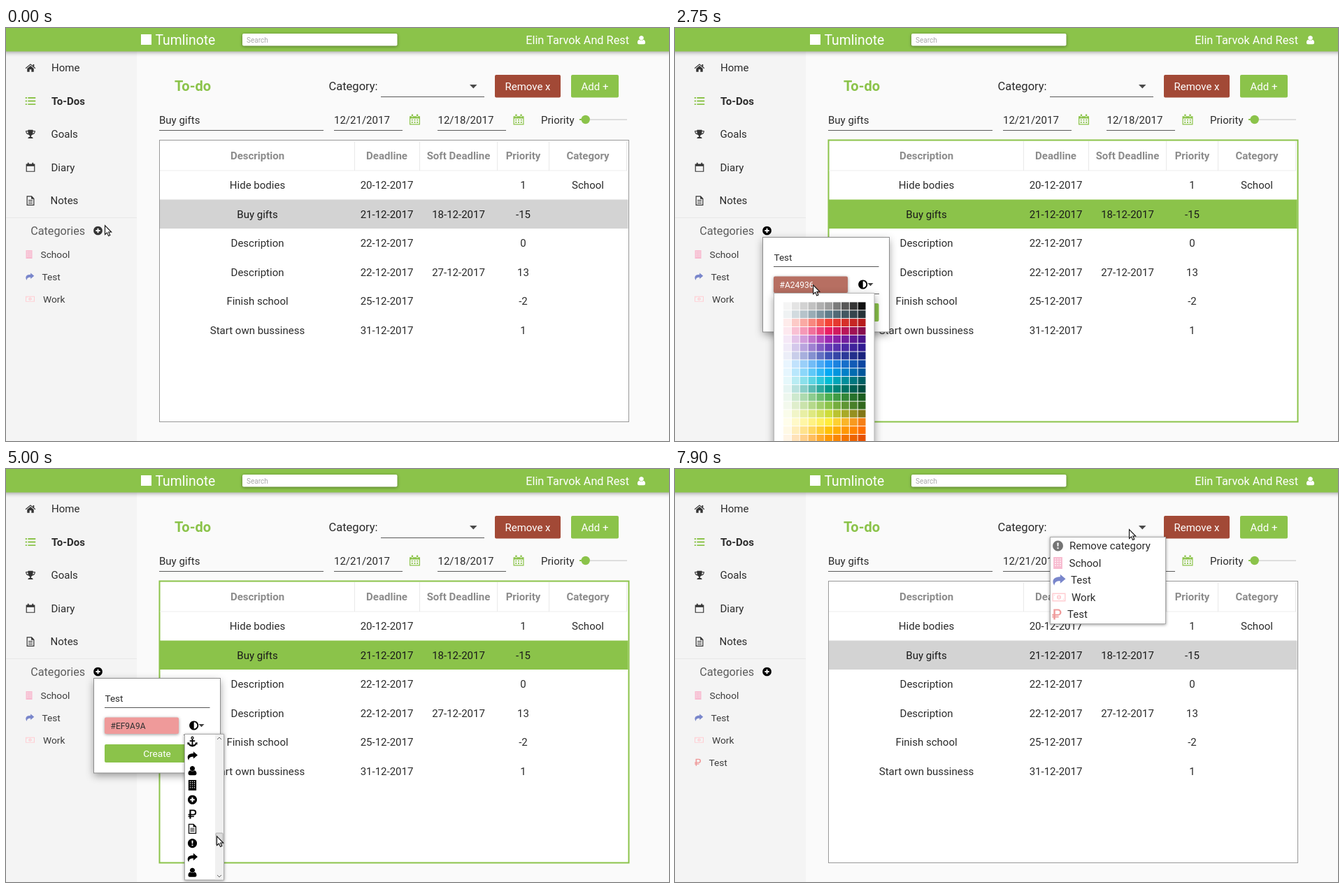
An HTML page for the animation above (8 s loop, 948x591 px).

```html
<!DOCTYPE html>
<html lang="en">
<head>
<meta charset="utf-8">
<title>To-do</title>
<style>
html, body { margin: 0; width: 100%; height: 100%; overflow: hidden; background: #fafafa; }
svg#stage { display: block; width: 100vw; height: 100vh; font-family: Roboto, sans-serif; }
text { white-space: pre; }
.bar { filter: drop-shadow(0 1px 3px rgba(0,0,0,.4)); }
.raised { filter: drop-shadow(0 1px 2px rgba(0,0,0,.4)); }
.floating { filter: drop-shadow(0 4px 6px rgba(0,0,0,.38)); }
</style>
</head>
<body>
<svg id="stage" viewBox="0 0 948 591"></svg>
<script>
const GREEN = '#8bc34a', RED = '#a24936', PINK = '#ef9a9a', INK = '#2b2b2b';
const PITCH = 20.8, LIST_ROWS = 62, PICKED = 45;

// Glyphs on a 16 x 16 grid
const bars = rows => rows.map(([x, w], i) => `M${x} ${2 + i * 3.4}h${w}v2h${-w}z`).join('');
const disc = 'M8 1a7 7 0 1 0 .01 0z';
const GLYPHS = {
  home: 'M8 1.6L16 8.4 15.2 9.4 8 3.4 .8 9.4 0 8.4zM11.8 2.4h2v4l-2-1.7zM2.8 9L8 4.7 13.2 9v5.4H9.5v-4h-3v4H2.8z',
  list: [2, 7, 12].map(y => `M0 ${y}h2.4v2H0zM4 ${y}h12v2H4z`).join(''),
  trophy: 'M4 1h8v1.5h3.6c0 4-1.6 5.6-4.6 6L9 10.6V12c2 0 3 1 3 2.6H4C4 13 5 12 7 12v-1.4L5 8.5C2 8.1.4 6.5.4 2.5H4zM1.7 3.7c.3 2 1.1 2.9 2.6 3.3L4 3.7zM14.3 3.7c-.3 2-1.1 2.9-2.6 3.3L12 3.7z',
  calendar: 'M1 2.5h2.4V.6h2v1.9h5.2V.6h2v1.9H15V15H1zM2.3 6.2v7.5h11.4V6.2z',
  file: 'M2 .5h8L14 4.6v11H2zM3.3 1.8v12.5h9.4V5.4H9.2V1.8zM4.8 7h6.4v1H4.8zM4.8 9.3h6.4v1H4.8zM4.8 11.6h6.4v1H4.8z',
  plus: disc + 'M6.9 4.5h2.2v2.4h2.4v2.2H9.1v2.4H6.9V9.1H4.5V6.9h2.4z',
  warn: disc + 'M6.9 3.8h2.2l-.3 5H7.2zM7 10h2v2H7z',
  adjust: disc + 'M8 3v10a5 5 0 0 0 0-10z',
  user: 'M8 1a3.8 3.8 0 1 1-.01 0zM4.6 7.6C6.5 9.4 9.5 9.4 11.4 7.6 13.6 8.2 14.4 10 14.4 12.5Q14.4 15 12 15H4Q1.6 15 1.6 12.5C1.6 10 2.4 8.2 4.6 7.6z',
  grid: 'M0 3h16v13H0zM1.3 6.4v8.3h13.4V6.4zM3 0h2.4v4H3zM10.6 0H13v4h-2.4z' +
    [3, 7, 11].map(x => `M${x} 7.6h2v2h-2zM${x} 11.3h2v2h-2z`).join(''),
  building: 'M2 0h12v16H2z' + [2, 5, 8, 11].map(y => [4, 7.2, 10.4].map(x => `M${x} ${y}h1.5v1.3h-1.5z`).join('')).join(''),
  share: 'M9.5 1L16 6.5 9.5 12V9C4.6 9 3 10.4 2.4 14.5-1.4 8.4 1.8 4 9.5 4z',
  money: 'M0 3h16v10H0zM1.2 4.2v7.6h13.6V4.2zM8 5.2c2 0 2.6 1.4 2.6 2.8S10 10.8 8 10.8 5.4 9.4 5.4 8 6 5.2 8 5.2zM7.5 6.3v3.4h1V6.3zM2 5h1.6L2 6.6zM14 11h-1.6L14 9.4z',
  ruble: 'M3.6 1h6.2a4.3 4.3 0 0 1 0 8.6H5.9v1h4.6v1.7H5.9V15H3.6v-2.7H1.7v-1.7h1.9v-1H1.7V7.7h1.9zM5.9 2.9v4.8h3.6a2.4 2.4 0 0 0 0-4.8z',
  dot: disc,
  block: 'M2 2h12v12H2z',
  center: bars([[4, 8], [1, 14], [3, 10], [0, 16]]),
  justify: bars([[0, 16], [0, 16], [0, 16], [0, 16]]),
  left: bars([[0, 11], [0, 15], [0, 9], [0, 16]]),
  right: bars([[5, 11], [1, 15], [7, 9], [0, 16]]),
  ambulance: 'M6 2h10v10h-1.5a2 2 0 0 1-4 0H6a2 2 0 0 1-4 0H0V8l2.5-3.5H6zM2 8h3V5.8H3.2zM10 4v2H8v2h2v2h2V8h2V6h-2V4z',
  anchor: 'M8 0a2.4 2.4 0 0 1 1 4.5V6h3v2H9v5c2-.3 3.2-1 3.8-2L11.5 10 15.5 9v4l-1-1C13 14.8 10.5 15.4 8 16 5.5 15.4 3 14.8 1.5 12l-1 1V9l4 1-1.3 1c.6 1 1.8 1.7 3.8 2V8H4V6h3V4.5A2.4 2.4 0 0 1 8 0zM8 1.5a.9.9 0 1 0 .01 0z'
};
const OPTIONS = ['adjust', 'dot', 'center', 'justify', 'left', 'right', 'ambulance', 'anchor', 'block', 'dot'];
const MORE = ['home', 'calendar', 'building', 'list', 'share', 'file', 'trophy', 'plus', 'money', 'user', 'warn', 'anchor'];

// Markup helpers
const rect = (x, y, w, h, fill, extra = '') => `<rect x="${x}" y="${y}" width="${w}" height="${h}" fill="${fill}" ${extra}/>`;
const text = (x, cy, s, size = 15, fill = INK, extra = '') =>
  `<text x="${x}" y="${cy + size * .355}" font-size="${size}" fill="${fill}" ${extra}>${s}</text>`;
const mid = (x, cy, s, size, fill, extra = '') => text(x, cy, s, size, fill, 'text-anchor="middle" ' + extra);
const icon = (name, cx, cy, size, fill = INK, extra = '') =>
  `<path d="${GLYPHS[name]}" fill="${fill}" fill-rule="evenodd" transform="translate(${cx - size / 2} ${cy - size / 2}) scale(${size / 16})" ${extra}/>`;
const group = (id, body, extra = '') => `<g id="${id}" ${extra}>${body}</g>`;
const BOLD = 'font-weight="700"';

function header() {
  return rect(-5, -5, 958, 38.5, GREEN, 'class="bar"') +
    rect(193, 9, 15, 15, '#fff') + text(213.5, 17, 'Tumlinote', 19.3, '#fff') +
    rect(338, 8, 221.5, 17.5, '#fff', 'rx="2" class="raised"') + text(344, 17, 'Search', 10, '#aaa') +
    text(891, 17.5, 'Elin Tarvok And Rest', 16.3, '#fff', 'text-anchor="end"') + icon('user', 908.5, 17, 14, '#fff');
}

function sidebar() {
  const menu = [['home', 'Home', 65], ['list', 'To-Dos', 65], ['trophy', 'Goals', 64.5], ['calendar', 'Diary', 64.5], ['file', 'Notes', 63.5]];
  const cats = [['building', 'School', 49.5, '#f8bbd0', 33, 12], ['share', 'Test', 51.5, '#7986cb', 34, 12.5],
    ['money', 'Work', 53, '#ffcdd2', 34.5, 13], ['ruble', 'Test', 48.5, PINK, 32.7, 11.5]];
  return rect(0, 33, 187, 558, '#f4f4f4') + rect(0, 271, 187, 1, '#e8e8e8') +
    menu.map(([name, label, x], i) => {
      const on = i === 1, y = 57 + i * 47.5;
      return icon(name, 35, y, 14.5, on ? GREEN : '#333') + text(x, y, label, 15, INK, on ? BOLD : '');
    }).join('') +
    text(35.2, 290.5, 'Categories', 16.2, '#5c5c5c') + icon('plus', 131.5, 290, 14.5, '#333', 'id="plus"') +
    rect(0, 371.5, 187, 32, '#ebebeb', 'id="hoverWork"') + rect(0, 403.5, 187, 32, '#ebebeb', 'id="hoverNew"') +
    cats.map(([name, label, x, color, cx, size], i) => {
      const y = 324 + i * 31.9;
      return group('cat' + i, icon(name, cx, y, size, color) + text(x, y, label, 13.7, '#3c3c3c'));
    }).join('');
}

function form() {
  const line = (x, w, y = 146) => rect(x, y, w, 1, '#5a5a5a');
  return text(241, 83, 'To-do', 20, GREEN, BOLD) + text(461.5, 83.5, 'Category:', 16.5) +
    line(536, 148, 98) + '<path d="M663 81h10.5l-5.2 5.5z" fill="#4a4a4a"/>' +
    rect(699, 67, 94, 32.5, RED, 'rx="2"') + mid(746, 83.5, 'Remove x', 15, '#fff') +
    rect(808, 67, 68, 32.5, GREEN, 'rx="2"') + mid(842, 83.5, 'Add +', 15, '#fff') +
    text(219, 131.5, 'Buy gifts') + line(219, 235) +
    text(469, 131.5, '12/21/2017') + line(469, 98) + icon('grid', 584.5, 131, 15, GREEN) +
    text(617.5, 131.5, '12/18/2017') + line(617, 98) + icon('grid', 733, 131, 15, GREEN) +
    text(765, 131.5, 'Priority') + rect(820, 130.5, 68, 1.2, '#ccc') + rect(820, 130, 9, 2, GREEN) +
    `<circle cx="828.7" cy="131" r="6.2" fill="${GREEN}"/>`;
}

function table() {
  const centers = [359.5, 544.5, 647, 739.5, 832];
  const rows = [['Hide bodies', '20-12-2017', '', '1', 'School'], ['Buy gifts', '21-12-2017', '18-12-2017', '-15', ''],
    ['Description', '22-12-2017', '', '0', ''], ['Description', '22-12-2017', '27-12-2017', '13', ''],
    ['Finish school', '25-12-2017', '', '-2', ''], ['Start own bussiness', '31-12-2017', '', '1', '']];
  return rect(219.5, 160.5, 671, 403, '#fff', 'id="frame"') + rect(220, 203.5, 668, 1, '#eee') +
    [498, 591, 702, 776, 887].map(x => rect(x, 162, 1, 42, '#e9e9e9')).join('') +
    rect(220, 245.5, 669.5, 41.5, '#d3d3d3', 'id="selected"') +
    ['Description', 'Deadline', 'Soft Deadline', 'Priority', 'Category']
      .map((s, i) => mid(centers[i], 183, s, 15, '#8c8c8c', BOLD)).join('') +
    rows.map((row, r) => row.map((s, i) => s && mid(centers[i], 225 + r * 41.5, s, 15, r === 1 ? '#1a1a1a' : INK)).join('')).join('');
}

function popup() {
  return group('popup', rect(125.5, 299.5, 0, 0, '#fff', 'id="sheet" class="floating"') +
    group('content', rect(125.5, 299.5, 181, 135.5, 'none', 'stroke="#8e8e8e"') +
      text(141.5, 328, '', 13.5, INK, 'id="name"') + rect(0, 320, 1, 15, '#333', 'id="caret"') +
      rect(141, 341, 150.5, 1, '#555', 'id="nameLine"') +
      rect(141, 355.5, 106, 23.5, RED, 'rx="2" class="raised" id="swatch"') + text(149.5, 367.5, '', 12, '#fff', 'id="hex"') +
      icon('adjust', 268.7, 367, 15, '#000', 'id="chosenOld"') + icon('ruble', 268.7, 367, 14, '#000', 'id="chosenNew"') +
      '<path d="M275.5 365h8l-4 4.2z" fill="#444"/>' + rect(254, 380, 38, 1, '#666') +
      group('create', rect(141, 394, 150.5, 26, GREEN, 'rx="2"') + mid(216, 407.5, 'Create', 13.6, '#fff'))));
}

// Each swatch row runs from a tint over the base colour to the dark shade
const SHADES = `9e9e9e 111111 607d8b 263238 f44336 b71c1c e91e63 880e4f 9c27b0 4a148c 673ab7 311b92
  3f51b5 1a237e 2196f3 0d47a1 03a9f4 01579b 00bcd4 006064 009688 004d40 4caf50 1b5e20 8bc34a 33691e
  cddc39 827717 ffeb3b f57f17 ffc107 ff6f00 ff9800 e65100`.split(/\s+/);
function mix(a, b, k) {
  const channel = (hex, i) => parseInt(hex.slice(i, i + 2), 16);
  return `rgb(${[0, 2, 4].map(i => Math.round(channel(a, i) + (channel(b, i) - channel(a, i)) * k))})`;
}
function palette() {
  let cells = '';
  for (let r = 0; r < SHADES.length / 2; r++) for (let c = 0; c < 10; c++) {
    const base = SHADES[r * 2], dark = SHADES[r * 2 + 1];
    const fill = c < 5 ? mix('ffffff', base, .1 + c * .18) : mix(base, dark, (c - 5) / 4);
    cells += rect(155 + c * 11.85, 392.4 + r * 11.85, 10.9, 10.9, fill);
  }
  return group('palette', rect(141.5, 379.5, 143.5, 230, '#fff', 'stroke="#b5b5b5" class="floating"') + cells +
    rect(174.5, 412.5, 18, 18.5, PINK, 'stroke="#2a9fd0" stroke-width="2" id="cell"'));
}

function iconList() {
  let items = '';
  for (let i = 0; i < LIST_ROWS; i++) {
    const name = i === PICKED ? 'ruble' : OPTIONS[i] || MORE[(i * 5 + (i / 12 | 0)) % MORE.length];
    items += icon(name, i ? 266.5 : 265, 390 + i * PITCH, i ? 15 : 14, '#000');
  }
  return group('list', rect(255.5, 379.5, 56, 208.5, '#fff', 'stroke="#aaa" class="raised"') +
    '<clipPath id="clip"><path d="M256 380h42.5v207.5H256z"/></clipPath>' +
    `<g clip-path="url(#clip)">${group('items', rect(256, 380, 42.5, PITCH, '#0096c9', 'id="mark"') + items)}</g>` +
    rect(299, 380, 12, 207.5, '#f0f0f0') + rect(300, 391, 10, 17, '#ddd', 'id="thumb" rx="1" stroke="#aaa"') +
    '<path d="M302 387l3-3 3 3M302 581l3 3 3-3" fill="none" stroke="#666"/>');
}

function categoryMenu() {
  const rows = [['warn', 'Remove category', 564, '#757575'], ['building', 'School', 563.5, '#f8bbd0'], ['share', 'Test', 566, '#7986cb'],
    ['money', 'Work', 567, '#ffcdd2'], ['ruble', 'Test', 561, PINK]];
  return group('menu', rect(536.5, 97.5, 165, 124, '#fff', 'stroke="#aaa" class="raised"') +
    rows.map(([name, label, x, color], i) => {
      const y = 110 + i * 24.5;
      return icon(name, i === 4 ? 546 : i > 1 ? 549 : 547.5, y, i > 1 && i < 4 ? 19 : 17, color) + text(x, y, label);
    }).join(''));
}

document.getElementById('stage').innerHTML = rect(0, 0, 948, 591, '#fafafa') + sidebar() + header() + form() + table() +
  popup() + palette() + iconList() + categoryMenu() +
  '<path id="cursor" d="M.5.5V13.5L3.5 10.8 5.6 15.6 7.8 14.6 5.7 10H9.7z" fill="#fff" stroke="#111" stroke-width="1.1"/>';

// Tracks are [time, value] keys; moves ease in and out
function at(keys, t, ease = true) {
  const i = keys.findIndex(k => k[0] > t);
  if (i < 0) return keys[keys.length - 1][1];
  if (i === 0) return keys[0][1];
  const [[t0, a], [t1, b]] = [keys[i - 1], keys[i]];
  let k = (t - t0) / (t1 - t0);
  if (ease) k = k * k * (3 - 2 * k);
  return a + (b - a) * k;
}
const PATH = [[0, 141, 282], [250, 133, 285], [600, 133, 285], [900, 168, 299], [1050, 170, 299], [2200, 170, 299],
  [2500, 200, 362], [2700, 198, 364], [3050, 183, 424], [3300, 183, 424], [3800, 278, 361], [4050, 278, 361],
  [4300, 301, 395], [4400, 301, 395], [5000, 301, 525], [5300, 268, 496], [5400, 268, 496], [5700, 222, 403],
  [5900, 226, 405], [6200, 226, 405], [6450, 110, 428], [6550, 112, 427], [7050, 550, 250], [7200, 583, 171],
  [7350, 583, 171], [7650, 655, 81], [7900, 649, 86]];
const PATH_X = PATH.map(([t, x]) => [t, x]), PATH_Y = PATH.map(([t, , y]) => [t, y]);
const GROW_X = [[550, 0], [900, .786], [1050, 1]], GROW_Y = [[550, 0], [800, .1], [900, .507], [1050, 1]];
const FADE = [[950, 0], [1150, 1]], SCROLL = [[4400, 0], [5000, (PICKED - 5) * PITCH]];
const KEYSTROKES = [1500, 1750, 1900, 2050];

const el = {};
document.querySelectorAll('[id]').forEach(node => el[node.id] = node);
const set = (id, attrs) => { for (const name in attrs) el[id].setAttribute(name, attrs[name]); };
const show = (id, on) => { el[id].style.display = on ? '' : 'none'; };

function render(t) {
  const within = (a, b) => t >= a && t < b;
  const x = at(PATH_X, t), y = at(PATH_Y, t);
  set('cursor', { transform: `translate(${x} ${y})` });

  set('plus', { fill: t < 150 ? '#333' : '#000' });
  show('hoverWork', within(2850, 3400));
  show('hoverNew', within(6350, 6650));
  show('cat3', t >= 6050);

  const focused = within(600, 7600);
  set('frame', { stroke: focused ? GREEN : '#999', 'stroke-width': focused ? 2 : 1 });
  set('selected', { fill: focused ? GREEN : '#d3d3d3' });

  show('popup', within(550, 5850));
  set('sheet', { width: 181 * at(GROW_X, t, false), height: 135.5 * at(GROW_Y, t, false) });
  set('content', { opacity: at(FADE, t, false) });
  const typed = KEYSTROKES.filter(k => t >= k).length;
  el.name.textContent = 'Test'.slice(0, typed);
  set('caret', { x: 142 + [0, 7.5, 15, 22, 27][typed] });
  show('caret', t < 2650);
  set('nameLine', { fill: t < 2650 ? GREEN : '#555' });
  set('create', { opacity: typed ? 1 : .4 });
  const repainted = t >= 3250;
  set('swatch', { fill: repainted ? PINK : t >= 2650 ? '#b76f62' : RED });
  set('hex', { fill: repainted ? '#333' : '#fff' });
  el.hex.textContent = repainted ? '#EF9A9A' : '#A24936';
  show('chosenOld', t < 5450);
  show('chosenNew', t >= 5450);

  show('palette', within(2700, 3350));
  show('cell', t >= 2950);

  const offset = at(SCROLL, t);
  const hovering = x < 299 && y > 380;
  show('list', within(4000, 5450));
  set('items', { transform: `translate(0 ${-offset})` });
  set('mark', { y: 380 + PITCH * (hovering ? Math.floor((y - 380 + offset) / PITCH) : 0) });
  set('thumb', { y: 391 + 169 * offset / ((LIST_ROWS - 10) * PITCH) });

  show('menu', t >= 7750);
}

function tick(now) {
  render(Math.floor(now % 8000 / 50) * 50);
  requestAnimationFrame(tick);
}
render(0);
requestAnimationFrame(tick);
</script>
</body>
</html>
```
